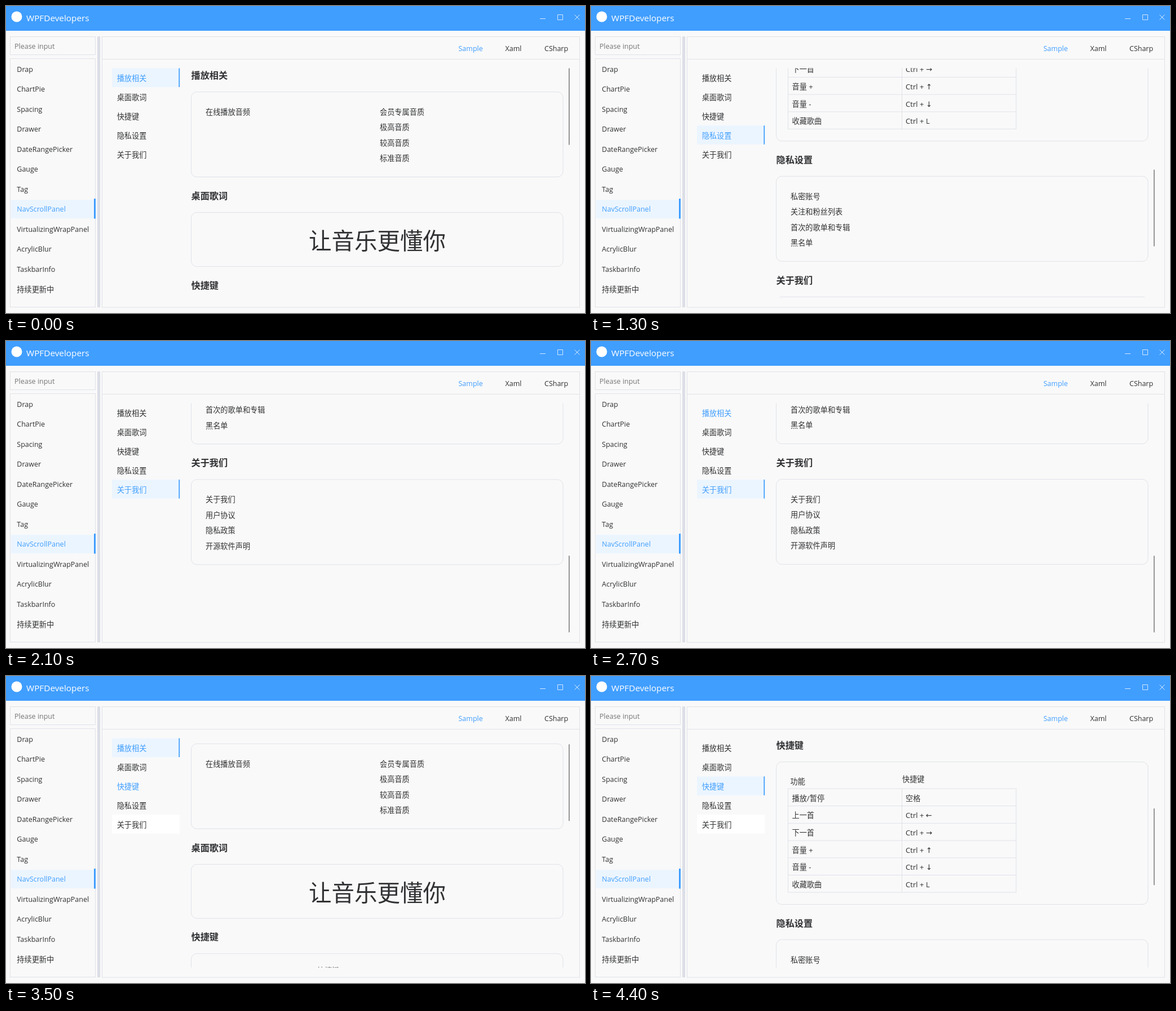
An HTML page for the animation above (4700 ms loop, 1027x545 px).

```html
<!DOCTYPE html>
<html lang="zh-CN">
<head>
<meta charset="utf-8">
<style>
html, body { margin: 0; width: 100%; height: 100%; overflow: hidden; background: #f9f9f9; }
svg { display: block; width: 1027px; height: 545px; }
text { font: 13.2px "Open Sans", "DejaVu Sans", "Noto Sans CJK SC", "Noto Sans CJK", sans-serif; fill: #303133; }
.ui { font-size: 12.5px; }
.title { font-size: 15.3px; fill: #fff; }
.head { font-size: 16.2px; font-weight: bold; }
.big { font-size: 40.5px; text-anchor: middle; }
.hint { fill: #757575; }
.on { fill: #409eff; }
.box { fill: none; stroke: #dfe2e9; }
.icon { fill: none; stroke: #d3e8ff; }
</style>
</head>
<body>
<svg viewBox="0 0 1027 545">
  <defs><clipPath id="view"><rect x="320" y="110.5" width="672" height="407"/></clipPath></defs>
  <g id="frame"></g>
  <g id="nav"></g>
  <g clip-path="url(#view)"><g id="page"></g></g>
  <rect id="thumb" x="998" width="1.7" height="136" fill="#858585"/>
</svg>
<script>
const $ = id => document.getElementById(id);
const BLUE = '#409eff', PALE = '#ebf5ff';
const LOOP = 4700, STEP = 100, GLIDE = 750;
const VIEW = 407, EXTENT = 1216;

const text = (x, y, s, cls = '') => `<text x="${x}" y="${y}" class="${cls}">${s}</text>`;
const fill = (x, y, w, h, c) => `<rect x="${x}" y="${y}" width="${w}" height="${h}" fill="${c}"/>`;
const box = (x, y, w, h, r = 0) => `<rect x="${x}" y="${y}" width="${w}" height="${h}" rx="${r}" class="box"/>`;
const line = (d, cls = 'box') => `<path d="${d}" class="${cls}"/>`;

// Window, sidebar and tabs
const demos = ['Drap', 'ChartPie', 'Spacing', 'Drawer', 'DateRangePicker', 'Gauge', 'Tag',
  'NavScrollPanel', 'VirtualizingWrapPanel', 'AcrylicBlur', 'TaskbarInfo'];
$('frame').innerHTML =
  fill(0, 0, 1027, 44, BLUE) +
  '<circle cx="19" cy="19" r="9.5" fill="#fff"/>' +
  text(36, 26.5, 'WPFDevelopers', 'title') +
  line('M947 22.5h10M978.5 15.5h9v9h-9zM1008.5 15.5l9 9m0-9l-9 9', 'icon') +
  box(7.5, 54.5, 151, 32) + text(15, 76, 'Please input', 'ui hint') +
  box(7.5, 93.5, 151, 441) +
  fill(9, 344, 147, 33, PALE) + fill(156, 342, 3, 35.5, BLUE) +
  demos.map((s, i) => text(19.3, 117 + 35.45 * i, s, i == 7 ? 'ui on' : 'ui')).join('') +
  text(19.3, 507.5, '持续更新中') +
  fill(162, 54, 5, 481, '#dcdfe6') +
  box(170.5, 54.5, 847, 480.5) + line('M171 94.5H1017') +
  text(802.5, 80, 'Sample', 'ui on') + text(885.5, 80, 'Xaml', 'ui') +
  '<text id="csharp" x="955" y="80" class="ui">CSharp</text>';

// Scrolling page
const names = ['播放相关', '桌面歌词', '快捷键', '隐私设置', '关于我们'];
const cards = [[152.5, 151], [366.5, 96], [525, 253], [840.5, 151], [1054.5, 151]];
const list = (x, top, items) => items.map((s, i) => text(x, top + 40.5 + 27.4 * i, s)).join('');
const keys = [['播放/暂停', '空格'], ['上一首', 'Ctrl + ←'], ['下一首', 'Ctrl + →'],
  ['音量 +', 'Ctrl + ↑'], ['音量 -', 'Ctrl + ↓'], ['收藏歌曲', 'Ctrl + L']];
$('page').innerHTML =
  cards.map(([y, h], i) => text(328.5, y - 23.5, names[i], 'head') + box(328.5, y, 659.5, h, 10)).join('') +
  list(354, 152.5, ['在线播放音频']) +
  list(663, 152.5, ['会员专属音质', '极高音质', '较高音质', '标准音质']) +
  text(658.5, 432.4, '让音乐更懂你', 'big') +
  text(353.5, 564.5, '功能') + text(552, 560.5, '快捷键') +
  box(349.5, 572.5, 404.5, 184) + line('M551.5 572.5v184') +
  keys.map(([a, b], i) => {
    const y = 572.5 + 30.7 * i;
    return (i ? line(`M349.5 ${y}h404.5`) : '') + text(356.5, y + 21.5, a) + text(558, y + 21.5, b);
  }).join('') +
  list(354, 840.5, ['私密账号', '关注和粉丝列表', '首次的歌单和专辑', '黑名单']) +
  list(354, 1054.5, ['关于我们', '用户协议', '隐私政策', '开源软件声明']);

// [time, value]: glide targets, chosen entries, hovered entries
const glides = [[512, 214], [1059, 687.5], [1450, EXTENT - VIEW], [3006, 0], [3650, 372.5]];
const picks = [[0, 0], [600, 1], [1100, 3], [1500, 4], [2900, 0], [3700, 2]];
const hovers = [[0, -1], [600, 1], [1000, 2], [1100, 3], [1400, 4], [2400, 3], [2500, 2],
  [2600, 1], [2700, 0], [3400, 1], [3500, 2], [4000, -1]];

const at = (track, t) => track.filter(k => k[0] <= t).pop()[1];

function scrollAt(t) {
  let pos = 0;
  glides.forEach(([start, goal], i) => {
    if (t <= start) return;
    const end = Math.min(t, i + 1 < glides.length ? glides[i + 1][0] : LOOP);
    const u = Math.min(1, (end - start) / GLIDE);
    pos += (goal - pos) * (1 - (1 - u) ** 3);
  });
  return pos;
}

function draw(now) {
  const t = Math.floor(now % LOOP / STEP) * STEP;
  const pos = scrollAt(t), pick = at(picks, t), hover = at(hovers, t);
  $('page').setAttribute('transform', `translate(0 ${-pos})`);
  $('thumb').setAttribute('y', 110.5 + pos * VIEW / EXTENT);
  $('csharp').classList.toggle('on', t == 200 || t == 4300);
  $('nav').innerHTML = names.map((s, i) => {
    const y = 110.5 + 33.9 * i, on = i == pick;
    const back = on ? PALE : i == 4 && t >= 2900 ? '#fff' : 'none';
    return fill(188, y, 120, 33.5, back) + (on ? fill(306.4, y, 1.8, 33.5, BLUE) : '') +
      text(196.7, y + 22.5, s, on || i == hover ? 'on' : '');
  }).join('');
}

const begin = performance.now();
function tick() {
  draw(performance.now() - begin);
  requestAnimationFrame(tick);
}
tick();
</script>
</body>
</html>
```
